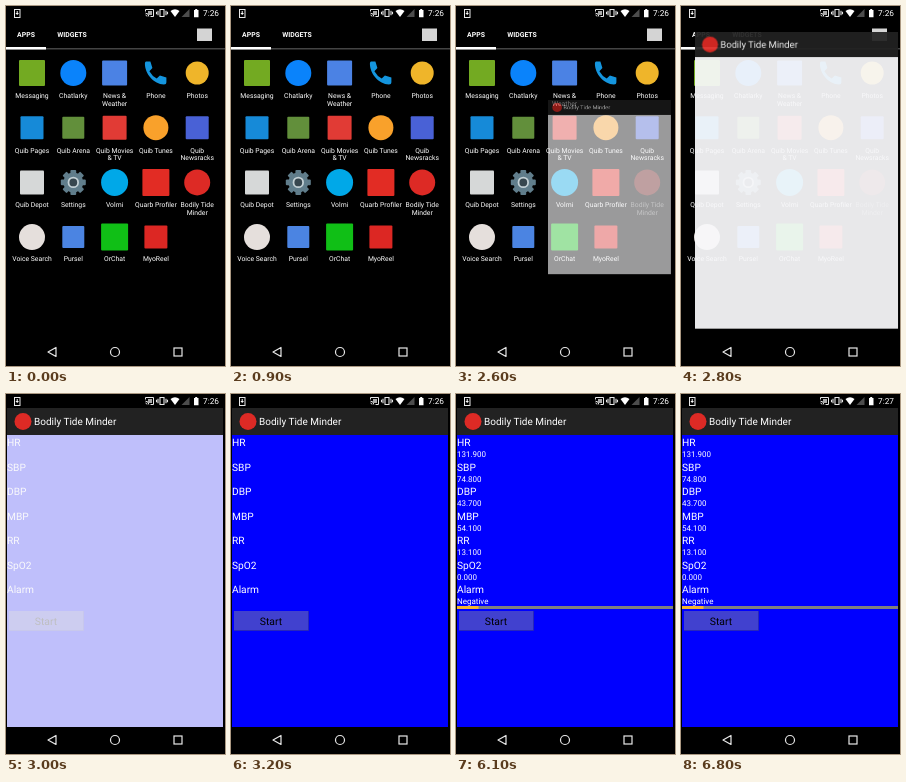
An HTML page that plays this animation: 219x360 px, repeating every 8 s.

```html
<!DOCTYPE html>
<html lang="en">
<head>
<meta charset="utf-8">
<title>Launching an app</title>
<style>
html, body { margin: 0; width: 219px; height: 360px; overflow: hidden; background: #000; }
svg { display: block; font-family: Roboto, sans-serif; fill: #fff; text-rendering: geometricPrecision; }
.mid { text-anchor: middle; }
.line { fill: none; stroke: #e8e8e8; }

/* Every change is a hard step on a 100 ms grid (1.25% of the loop). */
.anim { animation: 8s step-end infinite; }
#drawer { animation-name: drawer; }
#tapped { animation-name: tapped; }
#window { animation-name: zoom; }
#content { animation-name: content; }
#bar { animation-name: bar; }
#press { animation-name: press; }
#results { animation-name: results; }
#before { animation-name: before; }
#after { animation-name: after; }

@keyframes drawer { 0% { opacity: 1; } 36.25%, 100% { opacity: 0; } }
@keyframes tapped { 0% { opacity: 1; } 26.25%, 100% { opacity: .45; } }
@keyframes zoom {
  0% { opacity: 0; transform: translate(177px, 162px) scale(.13, .09); }
  30% { opacity: .18; transform: translate(163px, 150px) scale(.2, .18); }
  31.25% { opacity: .38; transform: translate(133px, 125px) scale(.352, .317); }
  32.5% { opacity: .62; transform: translate(92px, 94px) scale(.569, .546); }
  33.75% { opacity: .82; transform: translate(44px, 51px) scale(.796, .774); }
  35% { opacity: .94; transform: translate(14px, 26px) scale(.94, .93); }
  36.25%, 100% { opacity: 1; transform: translate(1px, 14px) scale(1); }
}
@keyframes content {
  0% { opacity: 0; }
  37.5% { opacity: .23; }
  38.75% { opacity: .62; }
  40%, 100% { opacity: 1; }
}
@keyframes bar { 0% { opacity: 0; } 55%, 100% { opacity: 1; } }
@keyframes press { 0% { opacity: 0; } 53.75% { opacity: .25; } 56.25%, 100% { opacity: 0; } }
@keyframes results { 0% { opacity: 0; } 76.25%, 100% { opacity: 1; } }
@keyframes before { 0% { opacity: 1; } 81.25%, 100% { opacity: 0; } }
@keyframes after { 0% { opacity: 0; } 81.25%, 100% { opacity: 1; } }
</style>
</head>
<body>
<svg width="219" height="360" viewBox="0 0 219 360">
  <rect width="219" height="360" fill="#000"/>

  <g id="drawer" class="anim">
    <g font-size="6.9" font-weight="700" class="mid">
      <text x="20" y="31.2">APPS</text>
      <text x="66" y="31.2">WIDGETS</text>
    </g>
    <rect y="42" width="219" height="1.5" fill="#444"/>
    <rect y="41" width="40" height="2.5"/>
    <rect x="191" y="22.5" width="15" height="12.5" fill="#d4d4d4"/>
    <g id="grid" class="mid" font-size="6.8"></g>
  </g>

  <g id="window" class="anim">
    <rect width="216" height="27" fill="#222"/>
    <rect y="27" width="216" height="292" fill="#f8f8fa"/>
    <circle cx="16" cy="13.5" r="8.5" fill="#dd2a25"/>
    <text x="27" y="17.4" font-size="10">Bodily Tide Minder</text>
    <g id="content" class="anim">
      <rect y="27" width="216" height="292" fill="#00f"/>
      <g id="labels" font-size="10.2"></g>
      <rect x="2" y="203" width="74.5" height="19.5" fill="#4141cf"/>
      <path d="M2 222.5h74.5v-19.5" fill="none" stroke="#2c2ca8" stroke-width=".7"/>
      <rect id="press" class="anim" x="2" y="203" width="74.5" height="19.5"/>
      <text class="mid" x="39" y="216.8" font-size="10.4" fill="#000">Start</text>
      <rect id="bar" class="anim" y="198" width="216" height="3" fill="#808080"/>
      <g id="results" class="anim" font-size="8">
        <rect y="198" width="21.5" height="3" fill="#f5b52e"/>
      </g>
    </g>
  </g>

  <g id="status">
    <rect width="219" height="14" fill="#000"/>
    <rect class="line" x="8.5" y="3.5" width="5.5" height="8"/>
    <path d="M10.7 5h1v2h1.3l-1.8 2-1.8-2h1.3z"/>
    <path class="line" d="M139.5 5.5v-2h8v7h-3M139.5 7.2a3.3 3.3 0 0 1 3.3 3.3M139.5 9a1.5 1.5 0 0 1 1.5 1.5"/>
    <rect x="142" y="5" width="4" height="4" fill="#aaa"/>
    <path class="line" d="M154 3.5h4v7h-4zM152 4.7v4.6M160 4.7v4.6M150.5 5.8v2.4M161.5 5.8v2.4" stroke-width="1.1"/>
    <path d="M164.5 5q4.5-3.4 9 0l-4.5 6z"/>
    <path d="M183.5 3v8h-8z" fill="#4c4c4c"/>
    <path d="M188 4h1.2V3h2v1h1.3v7.3H188z"/>
    <g font-size="8.3">
      <text id="before" class="anim" x="197" y="10.1">7:26</text>
      <text id="after" class="anim" x="197" y="10.1">7:27</text>
    </g>
  </g>

  <g class="line" stroke-width="1.2">
    <path d="M50 341.5v9l-8-4.5z" stroke-linejoin="round"/>
    <circle cx="109" cy="346" r="4.5"/>
    <rect x="168" y="342" width="8" height="8"/>
  </g>
</svg>

<script>
const make = (parent, tag, attrs, text = '') => {
  const el = document.createElementNS('http://www.w3.org/2000/svg', tag);
  for (const key in attrs) el.setAttribute(key, attrs[key]);
  el.textContent = text;
  return parent.appendChild(el);
};
const byId = id => document.getElementById(id);

const shapes = {
  square(g, fill, size = 26) {
    make(g, 'rect', { x: -size / 2, y: -size / 2, width: size, height: size, rx: 1, fill });
  },
  circle(g, fill, size = 26) {
    make(g, 'circle', { r: size / 2, fill });
  },
  phone(g, fill) {
    make(g, 'path', {
      fill,
      d: 'M-10-11.5h4.5l2 6.5-3 3.2q2.8 5 7.3 7.3l3.2-3 6.5 2v4.5q0 2.5-2.5 2.5C-2 11-11 1-11-9.5q0-1.5 1-2z'
    });
  },
  gear(g, fill) {
    for (let i = 0; i < 8; i++)
      make(g, 'rect', { x: -2.9, y: -12.5, width: 5.8, height: 8, rx: 1, fill, transform: `rotate(${i * 45})` });
    make(g, 'circle', { r: 10, fill });
    make(g, 'circle', { r: 4.8, fill: '#37474f', stroke: '#c3d0d5', 'stroke-width': 1.8 });
  }
};

const tapped = 'Bodily Tide|Minder';
const apps = [
  ['Messaging', 'square', '#73aa22'],
  ['Chatlarky', 'circle', '#0a83fb'],
  ['News &|Weather', 'square', '#4b82e4', 25],
  ['Phone', 'phone', '#1495de'],
  ['Photos', 'circle', '#efb52a', 23],
  ['Quib Pages', 'square', '#168ad8', 23],
  ['Quib Arena', 'square', '#628f3b', 22],
  ['Quib Movies|& TV', 'square', '#e13b35', 24],
  ['Quib Tunes', 'circle', '#f9a12b', 25],
  ['Quib|Newsracks', 'square', '#4961d6', 23],
  ['Quib Depot', 'square', '#d6d8d8', 24],
  ['Settings', 'gear', '#607d8b'],
  ['Volmi', 'circle', '#00a8e8', 27],
  ['Quarb Profiler', 'square', '#e22c24', 27],
  [tapped, 'circle', '#dd2a25', 26],
  ['Voice Search', 'circle', '#e5dfdc', 26],
  ['Pursel', 'square', '#4b84e2', 22],
  ['OrChat', 'square', '#10bf16', 27],
  ['MyoReel', 'square', '#dc2723', 23]
];

apps.forEach(([name, shape, color, size], i) => {
  const x = 26 + 41.3 * (i % 5), row = Math.floor(i / 5);
  const cell = make(byId('grid'), 'g', name === tapped ? { id: 'tapped', class: 'anim' } : {});
  const icon = make(cell, 'g', { transform: `translate(${x} ${67 + 54.7 * row})` });
  shapes[shape](icon, color, size);
  name.split('|').forEach((part, n) =>
    make(cell, 'text', { x, y: 92.1 + 54.4 * row + 7.6 * n }, part));
});

const readings = [
  ['HR', '131.900'], ['SBP', '74.800'], ['DBP', '43.700'], ['MBP', '54.100'],
  ['RR', '13.100'], ['SpO2', '0.000'], ['Alarm', 'Negative']
];
readings.forEach(([label, value], i) => {
  const y = 38 + 24.5 * i;
  make(byId('labels'), 'text', { x: 0, y }, label);
  make(byId('results'), 'text', { x: 0, y: y + 11.3 }, value);
});
</script>
</body>
</html>
```
